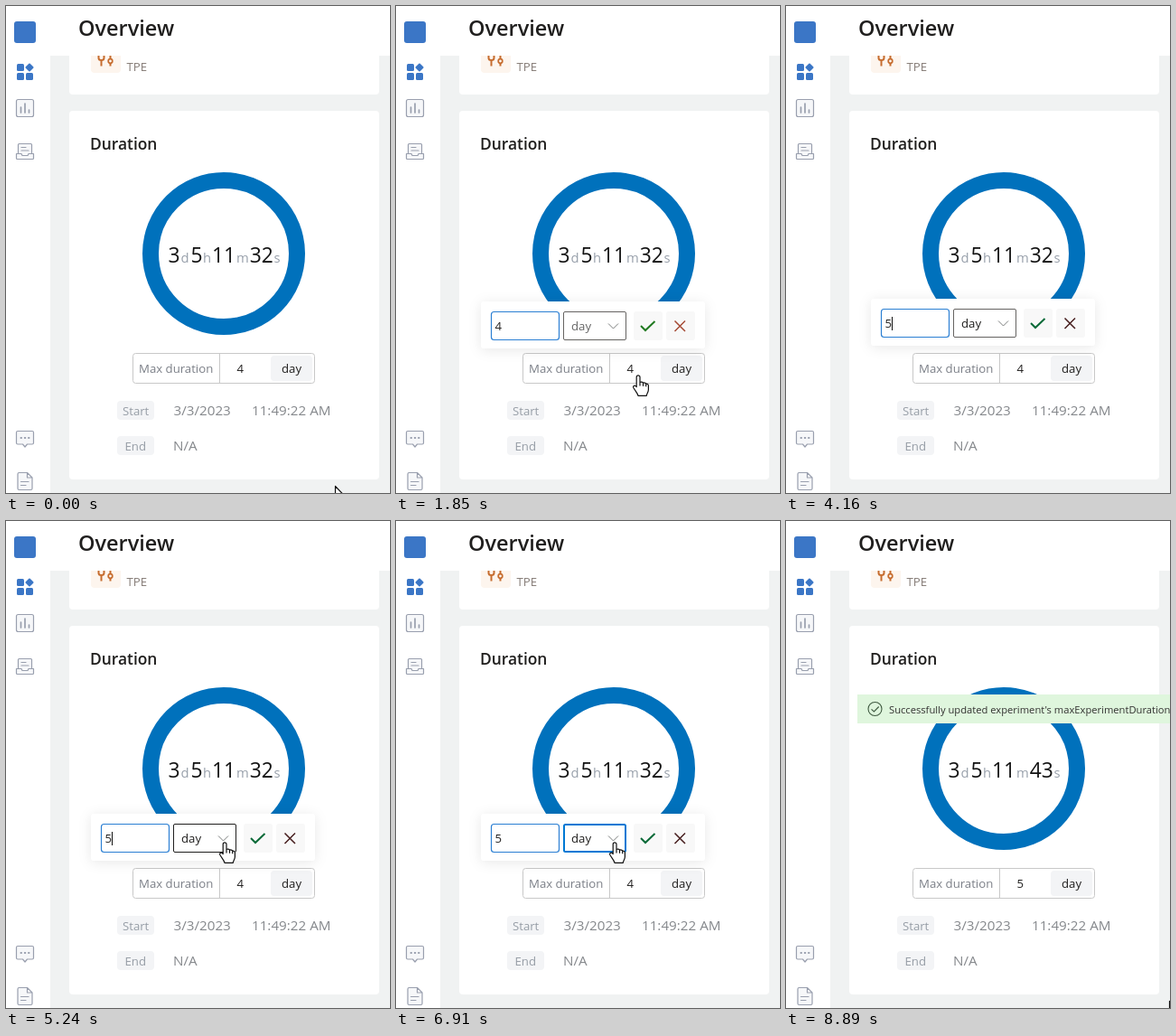
These frames come from a looping animation (425x539 px, 8960 ms). An HTML page:

```html
<!DOCTYPE html>
<html lang="en">
<head>
<meta charset="utf-8">
<title>Duration panel</title>
<style>
  html, body { margin: 0; width: 100%; height: 100%; overflow: hidden; background: #fff; }
  svg { display: block; width: 425px; height: 539px; }
  text { font: 13.2px "Open Sans", "Noto Sans", sans-serif; fill: #201f1e; white-space: pre; }
  .title { font-size: 23.5px; font-weight: 600; }
  .head { font-size: 17.4px; font-weight: 600; }
  .num { font-size: 22.8px; fill: #111; }
  .unit { font-size: 14.8px; fill: #98a0ab; }
  .date { font-size: 15.2px; fill: #85888c; }
  .label { fill: #7b7f87; }
  .tag { fill: #969da6; }
  .chip { fill: #f3f4f6; }
  .line { fill: #f6f7f9; stroke: #999fae; stroke-width: 1.2; stroke-linejoin: round; stroke-linecap: round; }
  .card { fill: #fff; }
  .pop { filter: drop-shadow(0 2px 7px rgba(0, 0, 0, .09)); }
  .cursor path { fill: #fff; stroke: #111; stroke-width: 1.2; stroke-linejoin: round; }
</style>
</head>
<body>
<svg width="425" height="539" xmlns="http://www.w3.org/2000/svg">
  <rect width="425" height="539" fill="#fff"/>
  <rect x="49" y="55" width="376" height="484" fill="#f0f2f2"/>
  <path class="card" d="M70 55H413V94a4 4 0 0 1-4 4H74a4 4 0 0 1-4-4Z"/>
  <rect class="card" x="70" y="116" width="343" height="408" rx="4"/>

  <!-- sidebar -->
  <rect x="9" y="17" width="24" height="24" rx="3" fill="#3b76c6"/>
  <g fill="#3b76c6">
    <rect x="12" y="64" width="8" height="8" rx="1.5"/>
    <rect x="12" y="74" width="8" height="8" rx="1.5"/>
    <rect x="22" y="74" width="8" height="8" rx="1.5"/>
    <rect x="22.5" y="64.5" width="7" height="7" rx="1" transform="rotate(45 26 68)"/>
  </g>
  <g class="line">
    <rect x="11.5" y="103.5" width="19" height="19" rx="2"/>
    <path d="M16.5 112V118M21 108V118M25.500 115V118" stroke-width="1.7"/>
    <path d="M13.500 163.500V153.500Q13.500 152.500 14.500 152.500H27.500Q28.500 152.500 28.500 153.500V163.500"/>
    <path d="M17 156.500H22M17 160H25"/>
    <path d="M11.500 163.500H17L18 165.500H24L25 163.500H30.500V168.500Q30.500 169.500 29.500 169.500H12.500Q11.500 169.500 11.500 168.500Z"/>
    <path d="M13 470.500H29Q30.500 470.500 30.500 472V483.500Q30.500 485 29 485H23.500L21 488 18.500 485H13Q11.500 485 11.500 483.500V472Q11.500 470.500 13 470.500Z"/>
    <path d="M16.500 478H17M20.800 478H21.300M25 478H25.500" stroke-width="2"/>
    <path d="M14.500 516.500H23.500L29 522V534Q29 535.500 27.500 535.500H14.500Q13 535.500 13 534V518Q13 516.500 14.500 516.500ZM23.500 516.500V522H29M16.500 526.500H25M16.500 530.500H22"/>
  </g>

  <!-- header and first card -->
  <text class="title" x="80" y="33">Overview</text>
  <path fill="#fdf5ee" d="M94 55H127V70a4 4 0 0 1-4 4H98a4 4 0 0 1-4-4Z"/>
  <path d="M102.500 55V57.500Q102.500 60 105.500 60T108.500 57.500V55M105.500 60V66.500M115.500 55V58.500M115.500 63.500V66.500" fill="none" stroke="#c66c2e" stroke-width="2"/>
  <circle cx="115.500" cy="61" r="2.300" fill="none" stroke="#c66c2e" stroke-width="1.700"/>
  <text x="133.500" y="72" style="fill:#857c77">TPE</text>

  <!-- duration card -->
  <text class="head" x="93" y="159">Duration</text>
  <circle cx="241" cy="274" r="81" fill="none" stroke="#0071bc" stroke-width="18"/>
  <text class="num" x="179.500" y="284">3</text><text class="unit" x="193.500" y="284">d</text>
  <text class="num" x="204.500" y="284">5</text><text class="unit" x="218" y="284">h</text>
  <text class="num" x="228" y="284">11</text><text class="unit" x="255" y="284">m</text>
  <text class="num" x="269.800" y="284" id="secs">32</text><text class="unit" x="296.500" y="284">s</text>

  <rect x="140.500" y="384.500" width="201" height="33" rx="3" fill="#fff" stroke="#c8c8c8"/>
  <path d="M236.500 385V417" stroke="#c8c8c8"/>
  <rect class="chip" x="293" y="387" width="46" height="28" rx="4"/>
  <text class="label" x="147" y="406">Max duration</text>
  <text x="255.500" y="406" id="limit">4</text>
  <text x="305" y="406">day</text>
  <rect class="chip" x="123" y="437" width="41" height="21" rx="4"/>
  <rect class="chip" x="123" y="476" width="41" height="21" rx="4"/>
  <text class="tag" x="129" y="453">Start</text>
  <text class="tag" x="131.500" y="492">End</text>
  <text class="date" x="185.500" y="453">3/3/2023</text>
  <text class="date" x="272" y="453">11:49:22 AM</text>
  <text class="date" x="185" y="492">N/A</text>

  <!-- editor popover -->
  <g id="editor">
    <rect class="card pop" x="94" y="324" width="248" height="52" rx="3"/>
    <rect x="105.500" y="335.500" width="75" height="31" rx="3" fill="#fff" stroke="#2b7fd3" stroke-width="1.200"/>
    <rect id="mark" x="110" y="344" width="8" height="15" fill="#0078d7"/>
    <text id="value" x="109.500" y="356">4</text>
    <path id="caret" d="M117.500 344V359" stroke="#111"/>
    <rect id="unit" fill="#fff"/>
    <text id="unitText" x="194" y="356">day</text>
    <path d="M235 348.500L240.500 354 246 348.500" fill="none" stroke="#7a7d7c"/>
    <rect x="263" y="335" width="32" height="32" rx="3" fill="#f8f8f8"/>
    <rect x="299" y="335" width="32" height="32" rx="3" fill="#f8f8f8"/>
    <path id="ok" d="M271 351L276 356 286.500 346" fill="none" stroke-width="2"/>
    <path id="cancel" d="M308.500 345.500L320 357M320 345.500L308.500 357" stroke-width="1.500"/>
  </g>

  <g id="menu">
    <rect class="card pop" x="185" y="367" width="70" height="108"/>
    <rect x="185" y="367" width="70" height="36" fill="#edebe9"/>
    <text x="194" y="390">day</text>
    <text x="194" y="426">hour</text>
    <text x="194" y="462">min</text>
  </g>

  <g id="notice">
    <rect x="79" y="192" width="346" height="32" fill="#dff6dd"/>
    <g fill="none" stroke="#3f5a40" stroke-width="1.100">
      <circle cx="98.500" cy="208" r="7.500"/>
      <path d="M94.500 208.300L97.400 211 102.700 205.500"/>
    </g>
    <text x="114" y="213" style="font-size:11.200px;fill:#323130">Successfully updated experiment's maxExperimentDuration</text>
  </g>

  <g id="cursor" class="cursor">
    <path id="arrow" d="M.5.5V16.500L4.200 13 6.700 18.800 9.200 17.700 6.700 12.200H11.700Z"/>
    <path id="hand" d="M0 .8C1.200.8 2 1.600 2 2.800V8.500C3 7.800 5 8 5.500 9.300 6.500 8.600 8.300 9 8.700 10.300 10 9.800 11.400 10.600 11.400 12.200V16.500C11.400 19.500 9.600 20.800 9.200 23.300H0C-.5 20.500-3.200 18-5.200 14.500-6 13-4.200 11.200-2.600 12.600L-1.800 13.500V2.800C-1.800 1.600-1.100.8 0 .8ZM2 8.500V12.500M5.500 9.300V12.800M8.700 10.300V13.200"/>
    <path id="beam" d="M-3-7.500H-1L0-6.500 1-7.500H3M0-6.500V6.500M-3 7.500H-1L0 6.500 1 7.500H3" style="fill:none"/>
  </g>
</svg>
<script>
const LOOP = 8960;
const $ = id => document.getElementById(id);
const show = (id, on) => { $(id).style.display = on ? '' : 'none'; };
const set = (id, attrs) => { for (const k in attrs) $(id).setAttribute(k, attrs[k]); };
const write = (id, s) => { if ($(id).textContent !== s) $(id).textContent = s; };

// Progress 0..1 in n equal jumps, the first at t0 and the last at t1.
function steps(t, t0, t1, n) {
  if (t < t0) return 0;
  return Math.min(1, (Math.floor((t - t0) / (t1 - t0) * (n - 1) + 1e-6) + 1) / n);
}

// Pointer moves: start, end, jumps, x, y, shape
const moves = [
  [70, 910, 13, 271, 418, 'arrow'],
  [980, 1190, 4, 268, 408, 'hand'],
  [2330, 2530, 4, 191, 380, 'arrow'],
  [2600, 2670, 2, 172, 370, 'arrow'],
  [2740, 3210, 6, 114, 352, 'beam'],
  [4490, 4560, 2, 150, 357, 'beam'],
  [4630, 4700, 2, 195, 369, 'arrow'],
  [4770, 4840, 2, 242, 355, 'hand'],
  [7110, 7480, 6, 278, 356, 'hand'],
  [8470, 8890, 7, 424, 531, 'arrow']
];

function pointer(t) {
  let x = 364, y = 531, shape = 'arrow';
  for (const [t0, t1, n, tx, ty, s] of moves) {
    if (t < t0) break;
    const p = steps(t, t0, t1, n);
    const e = n > 6 ? p * p * (3 - 2 * p) : p;
    x += (tx - x) * e;
    y += (ty - y) * e;
    shape = s;
  }
  return { x: Math.round(x), y: Math.round(y), shape };
}

function drawEditor(t) {
  const p = steps(t, 1520, 2130, 8);
  const out = steps(t, 8470, 8540, 2);
  const settled = p === 1;
  show('editor', p > 0 && out < 1);
  set('editor', {
    transform: `translate(0 ${Math.round(12 * (1 - p) ** 2)})`,
    opacity: Math.min(1, 2 * p) * (1 - out)
  });
  $('unitText').style.fill = settled ? '#201f1e' : '#666';
  set('ok', { stroke: settled ? '#0b6a38' : '#217a21' });
  set('cancel', { stroke: settled ? '#451c1c' : '#a54a35' });

  const selected = t >= 3210 && t < 4160;
  show('mark', selected);
  write('value', t < 4160 ? '4' : '5');
  $('value').style.fill = selected ? '#fff' : '#201f1e';
  show('caret', t >= 4160 && t < 4690 || t >= 5240 && t < 5370);

  const focused = t >= 5370 && t < 7810;
  const hovered = t >= 4770 && t < 5370;
  const inset = focused ? 1 : .5;
  set('unit', {
    x: 185 + inset, y: 335 + inset, width: 70 - 2 * inset, height: 32 - 2 * inset, rx: 1.5,
    stroke: focused ? '#0078d4' : hovered ? '#201f1e' : '#656361',
    'stroke-width': 2 * inset
  });
}

function drawMenu(t) {
  const p = steps(t, 5370, 5850, 7);
  const e = 1 - (1 - p) ** 3;
  const fade = 1 - steps(t, 6780, 6910, 2);
  show('menu', p > 0 && fade > 0);
  set('menu', { opacity: e * fade, transform: `translate(0 ${-10 * (1 - e)})` });
}

function drawPointer(t) {
  const c = pointer(t);
  set('cursor', { transform: `translate(${c.x} ${c.y})` });
  for (const s of ['arrow', 'hand', 'beam']) show(s, s === c.shape);
  show('cursor', t < 4160 || t >= 4490);
}

function draw(t) {
  write('secs', t < 7940 ? '32' : '43');
  write('limit', t < 8540 ? '4' : '5');
  show('notice', t >= 8540);
  drawEditor(t);
  drawMenu(t);
  drawPointer(t);
}

const start = performance.now();
function tick() {
  draw((performance.now() - start) % LOOP);
  requestAnimationFrame(tick);
}
draw(0);
requestAnimationFrame(tick);
</script>
</body>
</html>
```
